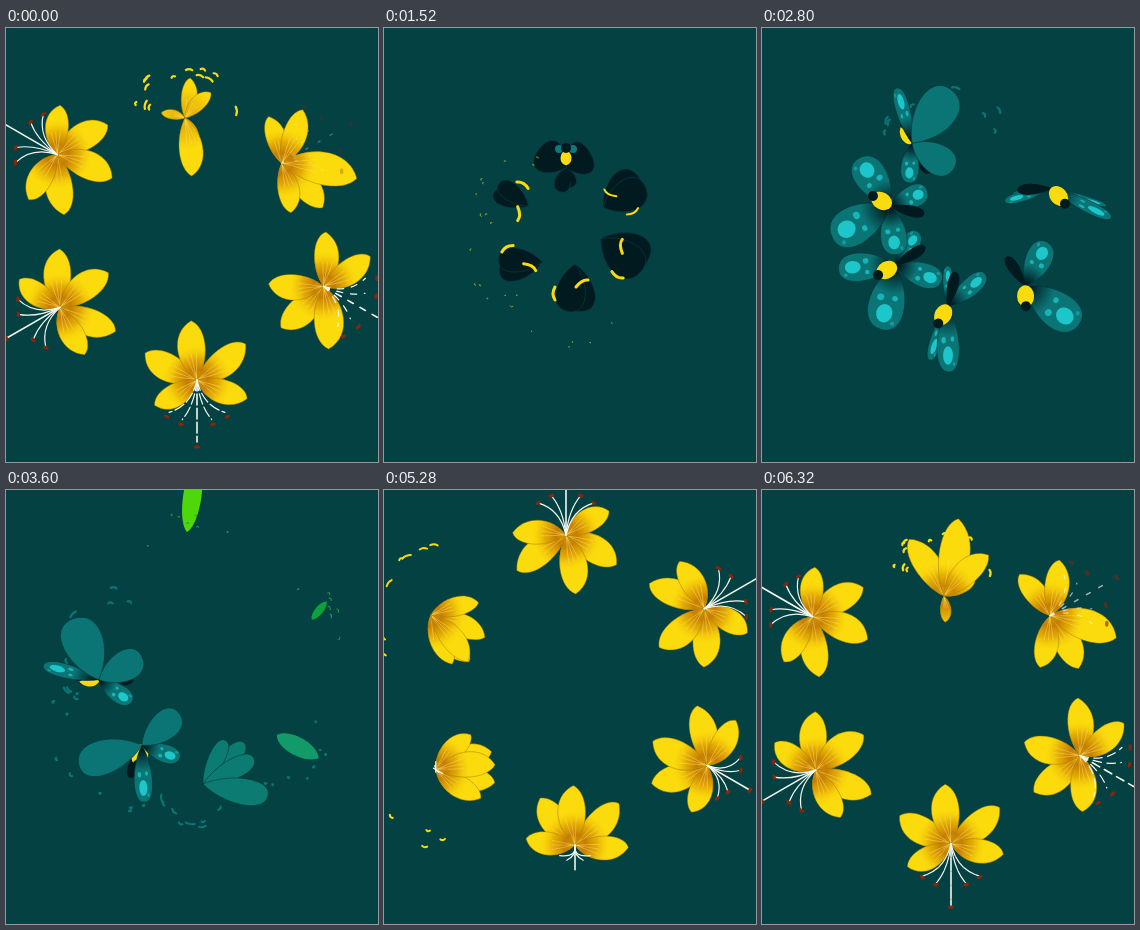
Animation, 372 px wide and 434 px high, one loop 6400 ms. Source, as an HTML page with a canvas:

```html
<!DOCTYPE html>
<html lang="en">
<head>
<meta charset="utf-8">
<title>Lily, butterfly, bud</title>
<style>
html, body { margin: 0; width: 100%; height: 100%; overflow: hidden; background: #034143; }
canvas { display: block; }
</style>
</head>
<body>
<canvas id="stage" width="372" height="434"></canvas>
<script>
const LOOP = 6400, STEP = 80, DELAY = 160, DEG = Math.PI / 180;
const YELLOW = '#fcdb0c', TEAL = '#0b7575', INK = '#001a20';
const g = document.getElementById('stage').getContext('2d');

const clamp = v => Math.max(0, Math.min(1, v));
const ramp = (t, a, b) => clamp((t - a) / (b - a));
const noise = n => { const v = Math.sin(n * 91.7) * 4375.5; return v - Math.floor(v); };

// Interpolates rows that begin with their time
function at(rows, t) {
  let i = 1;
  while (i < rows.length - 1 && rows[i][0] < t) i++;
  const a = rows[i - 1], b = rows[i], k = ramp(t, a[0], b[0]);
  return a.map((v, j) => v + (b[j] - v) * k).slice(1);
}

function turned(x, y, deg, draw) {
  g.save();
  g.translate(x, y);
  g.rotate(deg * DEG);
  draw();
  g.restore();
}

function oval(x, y, rx, ry, fill) {
  g.beginPath();
  g.ellipse(x, y, rx, ry, 0, 0, 7);
  g.fillStyle = fill;
  g.fill();
}

// Blade along the x axis; fat moves the belly, hook bends the tip sideways
function blade(len, w, base, fat, hook = 0) {
  g.beginPath();
  g.moveTo(0, 0);
  g.bezierCurveTo(len * base, -w * 1.25, len * fat, -w * 1.5 + hook * .3, len, hook);
  g.bezierCurveTo(len * fat * .95, w * 1.4 + hook * .4, len * base, w * 1.25, 0, 0);
}

function paint(fill, edge) {
  g.fillStyle = fill;
  g.fill();
  if (!edge) return;
  g.lineWidth = .7;
  g.strokeStyle = edge;
  g.stroke();
}

function line(w, color, x, y, cx, cy, x2, y2) {
  g.beginPath();
  g.moveTo(x, y);
  g.quadraticCurveTo(cx, cy, x2, y2);
  g.lineWidth = w;
  g.strokeStyle = color;
  g.stroke();
}

// Flying scraps: start, duration, colour, y, radius, count, size
const BITS = [
  [4200, 560, YELLOW, -158, 52, 9, 8],
  [6280, 720, YELLOW, -116, 44, 13, 9],
  [640, 400, '#a9b51a', -62, 40, 7, 3],
  [2680, 320, TEAL, -92, 48, 9, 9],
  [3040, 260, TEAL, -100, 28, 8, 8],
  [3300, 360, '#16a14c', -132, 26, 7, 4]
];

function bits(t) {
  BITS.forEach(([start, span, color, y, r0, n, size], s) => {
    const k = ((t - start + LOOP) % LOOP) / span;
    if (k > 1) return;
    const fade = Math.sin(Math.PI * (.15 + .85 * k));
    for (let i = 0; i < n; i++) {
      const seed = s * 40 + i + 1;
      const r = (r0 + 20 * k) * (.8 + .35 * noise(seed + 13));
      const len = size * fade * (.4 + .8 * noise(seed + 7));
      turned(-4, y, 180 + 180 * noise(seed), () =>
        line(Math.min(2.2, size / 4), color, r, -len / 2, r + 2, 0, r, len / 2));
    }
  });
}

// Time, hub x and y, angles of the five petals
const PETALS = [
  [4160, -8, -158, -86, -74, -66, 248, 260],
  [4320, -7, -161, -32, 8, 58, 156, 184],
  [4480, -3, -159, 38, 75, 104, 118, 134],
  [4640, 0, -155, 68, 95, 108, 140, 160],
  [4800, -5, -153, 0, 46, 81, 144, 190],
  [5120, -5, -158, -38, 23, 72, 152, 190],
  [5760, -1, -153, -33, 22, 77, 151, 190],
  [5920, -5, -150, -38, 20, 77, 151, 208],
  [6080, -17, -142, -42, 8, 55, 160, 215],
  [6240, -13, -111, -56, -20, 12, 202, 239],
  [6320, -4, -96, -50, -33, 80, 246, 288],
  [6400, -7, -112, -52, 62, 76, 200, 285]
];
const LENGTHS = [
  [5920, 49, 58, 59, 60, 53],
  [6240, 76, 60, 50, 48, 57],
  [6320, 60, 34, 26, 66, 78],
  [6400, 36, 30, 58, 24, 40],
  [7040, 0, 0, 0, 0, 0]
];

function stamens(t, x, y) {
  if (t < 4640 || t > 6300) return;
  const grow = ramp(t, 4640, 5040), loose = ramp(t, 5800, 6240);
  g.save();
  g.globalAlpha = 1 - ramp(t, 6080, 6300);
  for (let i = 0; i < 5; i++) turned(x, y, 270 + (i - 2) * 15, () => {
    const len = (i === 2 ? 62 : 42) * grow, bend = (i - 2) * 4;
    if (loose) g.setLineDash([2 + 12 * (1 - loose), 12 * loose]);
    line(i === 2 ? 1.6 : 1.2, '#f4f8ee', 0, 0, len * .6, -bend, len, bend);
    g.setLineDash([]);
    if (grow > .5) oval(len + 18 * loose, bend, 1.7, 3, '#86260c');
  });
  g.restore();
}

function petal(len, w, hook, heat) {
  blade(len, w, .28, .86, hook);
  paint(YELLOW);
  const glow = g.createRadialGradient(0, 0, 0, 0, 0, 36);
  glow.addColorStop(0, `rgba(214,150,12,${heat})`);
  glow.addColorStop(.3, `rgba(196,122,0,${heat * .95})`);
  glow.addColorStop(.6, `rgba(214,146,0,${heat * .65})`);
  glow.addColorStop(1, 'rgba(252,219,12,0)');
  paint(glow, 'rgba(150,112,0,.6)');
  if (heat > .4) for (const s of [-1, 0, 1])
    line(.6, 'rgba(255,222,110,.7)', 2, 0, len * .25, s * w * .25, len * .46, s * w * .4);
}

function flower(t) {
  const [x, hubY, ...angles] = at(PETALS, t), lens = at(LENGTHS, t);
  const y = hubY + 50 * ramp(t, 6400, 7040);
  const ratio = .19 + .04 * ramp(t, 4480, 4800) - .03 * ramp(t, 6080, 6320);
  const heat = ramp(t, 4100, 4400) * (1 - .7 * ramp(t, 6300, 6420));
  for (const i of [3, 1, 4, 0, 2]) {
    const len = lens[i];
    if (len > 1) turned(x, y, angles[i], () =>
      petal(len, len * ratio, (i < 3 ? 1 : -1) * len * .13, heat));
  }
  stamens(t, x, y);
}

// Time, hub x and y, direction, length
const POD = [
  [480, -2, -62, -90, 2],
  [720, 0, -48, -90, 37],
  [880, -14, -40, -64, 44],
  [1040, -5, -34, -90, 48],
  [1200, -8, -31, -88, 52],
  [1360, -3, -40, -94, 47]
];

function pod(t) {
  const [x, y, dir, len] = at(POD, t);
  for (const s of [-1, 1]) turned(x, y, dir + s * 9, () => {
    blade(len, len * (.24 + .1 * ramp(t, 720, 1200)), .35, 1.03);
    paint(INK, '#0a3a40');
  });
  const k = ramp(t, 560, 720) * (1 - ramp(t, 1280, 1500));
  line(3 * k + .01, YELLOW, 15, -70, 19, -64, 15, -57);
  line(3 * k + .01, YELLOW, -18, -50, -12, -49, -6, -57);
}

// Time, hub x and y, then angle and half width of the four wings
const WINGS = [
  [1520, -4, -62, -32, 17, 214, 17, 80, 8, 104, 8],
  [2000, -8, -62, -63, 16, 212, 19, 38, 11, 144, 13],
  [2160, -4, -63, -63, 14, 223, 18, 65, 9, 140, 12],
  [2320, 0, -76, -71, 6, 270, 11, 90, 5, 140, 9],
  [2480, 10, -95, -80, 3, 277, 18, 168, 3, 177, 13],
  [2640, 16, -111, -42, 3, 327, 6, 112, 3, 105, 5],
  [2800, -36, -87, -105, 7, 308, 20, 95, 9, 33, 15],
  [2960, -21, -70, -152, 9, 283, 17, 140, 9, 80, 14],
  [3120, -11, -92, -206, 10, 191, 13, 136, 9, 118, 8],
  [3280, -5, -95, -91, 6, 269, 9, 269, 4, 269, 4]
];
const HUE = [
  [1520, 0, 26, 32], [1960, 11, 117, 117], [3080, 11, 117, 117], [3280, 18, 154, 104],
  [3440, 14, 160, 58], [3600, 79, 215, 10], [3840, 180, 240, 10], [4160, 252, 219, 12]
];
const hue = t => `rgb(${at(HUE, t).map(Math.round)})`;

function spots(len, w, alpha) {
  g.save();
  g.clip();
  g.globalAlpha = alpha;
  const shade = g.createRadialGradient(0, 0, 0, 0, 0, len * .45);
  shade.addColorStop(.2, 'rgba(0,26,32,.95)');
  shade.addColorStop(1, 'rgba(0,26,32,0)');
  g.fillStyle = shade;
  g.fillRect(0, -w * 2, len, w * 4);
  oval(len * .75, 0, len * .14, w * .45, '#1cc6cb');
  oval(len * .52, w * .4, len * .05, w * .2, '#18b3b8');
  oval(len * .5, -w * .4, len * .04, w * .16, '#18b3b8');
  oval(len * .88, -w * .55, 2, w * .12, '#139a9f');
  g.restore();
}

function body(t, x, y, away) {
  if (t > 3040) return;
  const turn = ramp(t, 2800, 2960), size = .65 + .35 * ramp(t, 1520, 1960);
  const head = away ? -110 - 28 * turn : -90 + 80 * ramp(t, 2160, 2600);
  const tail = away ? 61 + 170 * turn : 74 + 44 * ramp(t, 2000, 2480);
  turned(x, y, tail, () => {
    blade(35 * ramp(t, 1200, 1960), 5.5, .4, 1);
    paint(INK);
  });
  turned(x, y, head, () => {
    oval(10, 0, 11 * size, 8.5 * size, YELLOW);
    if (t < 1700) for (const s of [-1, 1]) oval(19, s * 7, 4, 4, '#12777c');
    oval(20, 0, 5, 5, INK);
  });
}

function butterfly(t) {
  const [x, y, ...wings] = at(WINGS, t);
  const away = t > 2720, grow = .5 + .5 * ramp(t, 1520, 2000);
  const fold = ramp(t, 3120, 3280);
  if (away) body(t, x, y, away);
  for (const i of [2, 3, 0, 1]) {
    const full = 40 + [17, 26, 0, 9][i] + (i === 2 ? 18 * ramp(t, 2960, 3120) : 0);
    const len = (full + (48 - full) * fold) * grow, w = wings[i * 2 + 1];
    turned(x, y, wings[i * 2], () => {
      blade(len, w, .35, 1.03);
      paint(hue(t), t < 1600 ? '#0a3a40' : 'rgba(0,50,54,.7)');
      const lit = away ? (i % 2 ? 0 : 1 - ramp(t, 2960, 3100)) : ramp(t, 1680, 1960);
      if (lit) spots(len, w, lit);
    });
  }
  if (!away) body(t, x, y, away);
}

// Time, inner end, outer end, half width
const BUD = [
  [3280, -5, -95, -6, -143, 9],
  [3440, -3, -140, -11, -162, 4],
  [3600, -5, -160, 6, -232, 9],
  [3840, -2, -157, 7, -230, 13],
  [4160, -5, -158, 1, -230, 14]
];

function bud(t) {
  const [x, y, x2, y2, w] = at(BUD, t), len = Math.hypot(x2 - x, y2 - y);
  turned(x, y, Math.atan2(y2 - y, x2 - x) / DEG, () => {
    blade(len, w, .12, .8);
    paint(hue(t));
    if (t > 3700) for (const s of [-.7, .7])
      line(.7, 'rgba(150,140,0,.6)', 2, 0, len * .5, w * s, len - 2, 0);
  });
}

function figure(t) {
  if (t < 640) flower(t + LOOP);
  if (t >= 4160) flower(t);
  else if (t >= 3280) bud(t);
  else if (t >= 1440) butterfly(t);
  else if (t >= 480) pod(t);
  bits(t);
}

function frame() {
  const t = Math.floor(performance.now() % LOOP / STEP) * STEP;
  g.fillStyle = '#034143';
  g.fillRect(0, 0, 372, 434);
  g.lineCap = 'round';
  for (let i = 0; i < 6; i++)
    turned(186, 202, i * 60, () => figure((t - i * DELAY + LOOP) % LOOP));
  requestAnimationFrame(frame);
}
frame();
</script>
</body>
</html>
```
